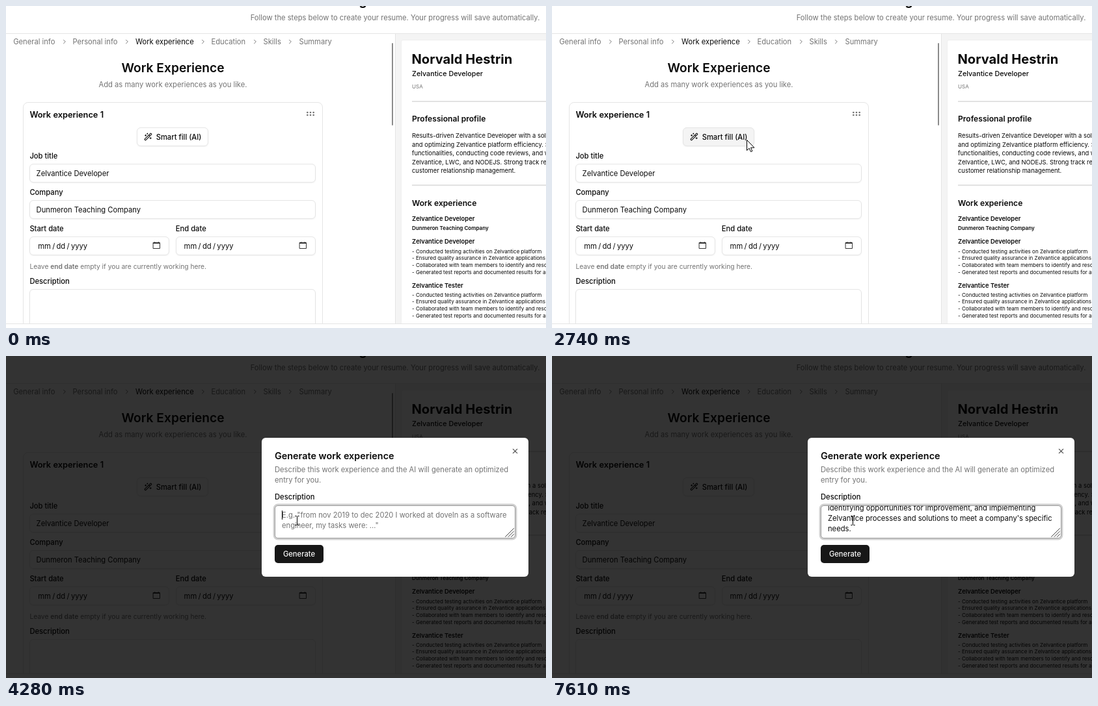
An HTML page that plays this animation: 830x496 px, repeating every 8000 ms.

```html
<!DOCTYPE html>
<html lang="en">
<head>
<meta charset="utf-8">
<title>Resume builder</title>
<style>
:root { --ink: #0a0a0a; --gray: #737373; --line: #e5e5e5; --t: 8s infinite; }
* { box-sizing: border-box; margin: 0; }
html, body { width: 100%; height: 100%; overflow: hidden; background: #fff; }
body { position: relative; font: 11.2px/20px Inter, sans-serif; font-optical-sizing: none; color: var(--ink); }
p, div, svg { position: absolute; }
svg { overflow: visible; fill: none; stroke-linecap: round; stroke-linejoin: round; }

/* --x is the left edge (or middle with .c), --y the middle of the line */
p { left: calc(var(--x) * 1px); top: calc(var(--y) * 1px - 10px); white-space: pre; }
.c { width: 500px; margin-left: -250px; text-align: center; }
.g { color: var(--gray); }
.m { font-weight: 500; }
.s, p b { font-weight: 600; }
.b { font-weight: 700; }
.h1 { font-size: 19.2px; }
.h2 { font-size: 14.4px; }
.h3 { font-size: 12.8px; }
.hint { font-size: 10.24px; }
.date { word-spacing: -.8px; }

.page { inset: 0; overflow: hidden; }
.head { left: 0; top: 42px; width: 100%; height: 1px; background: var(--line); }
.main { inset: 0 0 7px; overflow: hidden; }
.foot { left: 0; top: 489px; width: 100%; height: 7px; background: #fff; border-top: 1px solid var(--line); }
.card { left: 26px; top: 148px; width: 461px; height: 500px; border: 1px solid var(--line); border-radius: 8px; }
.box { border: 1px solid var(--line); border-radius: 6px; background: #fff; box-shadow: 0 1px 2px rgba(0,0,0,.05); height: 29px; width: 440px; left: 36px; }
.half { width: 215px; }
.fill { left: 201px; top: 187px; width: 110px; animation: hover var(--t) step-end; }
.thumb { left: 593px; top: 57px; width: 2px; height: 127px; border-radius: 1px; background: #8b8b8b; animation: thumb var(--t) step-end; }
.chev { stroke: var(--gray); stroke-width: .95; width: 4px; height: 6px; top: 52px; }
.cal { top: 363px; width: 11px; height: 11px; stroke: #333; }

.side { left: 598px; top: 43px; width: 240px; height: 446px; background: #f4f4f4; border-left: 1px solid var(--line); }
.paper { left: 608px; top: 53px; width: 300px; height: 500px; background: #fff; border-radius: 2px; box-shadow: 0 0 2px rgba(0,0,0,.08); }
.name { font-size: 20.15px; }
.role { font-size: 10.75px; }
.sec { font-size: 12.1px; }
.txt { font-size: 9.42px; line-height: 13.5px; }
.job { font-size: 9.42px; }
.tiny { font-size: 8.06px; }
.list { font-size: 8.06px; line-height: 10.7px; }
.rule { left: 624px; width: 300px; height: 2px; background: #e2e2e2; }

.modal { inset: 0; background: rgba(0,0,0,.8); animation: modal var(--t) step-end; }
.dialog { left: 393px; top: 126px; width: 410px; height: 214px; border-radius: 6px; background: #fff; }
.area { left: 413px; top: 230px; width: 370px; height: 51px; border: 1px solid #9c9c9c; border-radius: 5px; background: #fff; box-shadow: 0 0 0 2.4px #d0d0d0; overflow: hidden; }
.area p { left: 10px; line-height: 16px; }
.area .hold { top: 6px; animation: hold var(--t) step-end; }
.area .paste { top: -15px; animation: paste var(--t) step-end; }
.send { left: 413px; top: 291px; width: 75px; height: 28px; border-radius: 5px; background: #171717; }
.caret { left: 424px; top: 238px; width: 1px; height: 14px; background: #000; animation: caret var(--t) step-end; }
.beam { left: -3.5px; top: -7.5px; width: 7px; height: 15px; animation: beam var(--t) step-end; }
.arrow { left: 0; top: 0; width: 12px; height: 19px; animation: arrow var(--t) step-end; }

@keyframes hover { 0%, 35.875% { background: #fff } 24.3% { background: #f4f4f4 } }
@keyframes thumb { 0% { opacity: 1 } 69.375%, to { opacity: 0 } }
@keyframes modal { 0% { opacity: 0 } 35.875%, to { opacity: 1 } }
@keyframes hold { 0% { opacity: 1 } 65.25%, to { opacity: 0 } }
@keyframes paste {
  0% { opacity: 0; transform: none }
  65.25% { opacity: 1; transform: none }
  81.875% { opacity: 1; transform: translateY(16px) }
  87.75%, to { opacity: 1; transform: translateY(10px) }
}
@keyframes caret {
  0%, 50.25%, 63.5% { opacity: 1; transform: none }
  43.625%, 56.875% { opacity: 0; transform: none }
  65.25%, 78.625% { opacity: 1; transform: translate(3px, 27px) }
  72% { opacity: 0; transform: translate(3px, 27px) }
  81.125% { opacity: 1; transform: translate(0, 27px) }
  81.875% { opacity: 1; transform: translate(35px, 27px) }
  87.75% { opacity: 1; transform: translate(35px, 21px) }
  95.125%, to { opacity: 0; transform: translate(35px, 21px) }
}
@keyframes beam {
  0% { opacity: 0; transform: translate(435px, 253px) }
  46.125% { opacity: 1; transform: translate(435px, 253px) }
  48.625% { opacity: 1; transform: translate(425px, 255px) }
  50.25% { opacity: 1; transform: translate(439px, 254px) }
  53.5% { opacity: 1; transform: translate(447px, 253px) }
  54.375% { opacity: 1; transform: translate(459px, 253px) }
  71.125% { opacity: 1; transform: translate(461px, 253px) }
  93.5%, to { opacity: 1; transform: translate(462px, 253px) }
}
@keyframes arrow {
  0% { visibility: hidden; transform: translate(766px, 486px) }
  10.375% { visibility: visible; transform: translate(766px, 486px); animation-timing-function: steps(4) }
  13.875% { visibility: visible; transform: translate(606px, 360px); animation-timing-function: steps(4) }
  17.375% { visibility: visible; transform: translate(480px, 264px); animation-timing-function: steps(3) }
  20% { visibility: visible; transform: translate(376px, 224px); animation-timing-function: steps(3) }
  22.625% { visibility: visible; transform: translate(322px, 211px); animation-timing-function: steps(4) }
  26% { visibility: visible; transform: translate(299px, 206px) }
  40% { visibility: visible; transform: translate(299px, 206px); animation-timing-function: steps(6) }
  46.125%, to { visibility: hidden; transform: translate(427px, 244px) }
}
</style>
</head>
<body>
<div class="page">
  <p class="c h1 b" style="--x:598;--y:-8">Design Your Resume</p>
  <p class="c g" style="--x:598;--y:18">Follow the steps below to create your resume. Your progress will save automatically.</p>
  <div class="head"></div>

  <div class="main">
    <p class="g" style="--x:11.2;--y:55">General info</p>
    <p class="g" style="--x:102.4;--y:55">Personal info</p>
    <p style="--x:199;--y:55">Work experience</p>
    <p class="g" style="--x:315.5;--y:55">Education</p>
    <p class="g" style="--x:395.5;--y:55">Skills</p>
    <p class="g" style="--x:450.5;--y:55">Summary</p>
    <svg class="chev" style="left:88px"><path d="M.5 .2 3.3 3 .5 5.8"/></svg>
    <svg class="chev" style="left:184px"><path d="M.5 .2 3.3 3 .5 5.8"/></svg>
    <svg class="chev" style="left:301px"><path d="M.5 .2 3.3 3 .5 5.8"/></svg>
    <svg class="chev" style="left:381px"><path d="M.5 .2 3.3 3 .5 5.8"/></svg>
    <svg class="chev" style="left:435px"><path d="M.5 .2 3.3 3 .5 5.8"/></svg>

    <p class="c h1 s" style="--x:256.5;--y:95">Work Experience</p>
    <p class="c g" style="--x:256.5;--y:121">Add as many work experiences as you like.</p>
    <div class="thumb"></div>

    <div class="card"></div>
    <p class="h3 s" style="--x:36.4;--y:168">Work experience 1</p>
    <svg style="left:460px;top:158px" width="16" height="16" viewBox="0 0 24 24">
      <g fill="#737373"><circle cx="5" cy="9" r="2"/><circle cx="12" cy="9" r="2"/><circle cx="19" cy="9" r="2"/><circle cx="5" cy="15" r="2"/><circle cx="12" cy="15" r="2"/><circle cx="19" cy="15" r="2"/></g>
    </svg>
    <div class="box fill"></div>
    <svg style="left:211.6px;top:195px" width="12.8" height="12.8" viewBox="0 0 24 24" stroke="#0a0a0a" stroke-width="2">
      <path d="m21.64 3.64-1.28-1.28a1.21 1.21 0 0 0-1.72 0L2.36 18.64a1.21 1.21 0 0 0 0 1.72l1.28 1.28a1.2 1.2 0 0 0 1.72 0L21.64 5.36a1.2 1.2 0 0 0 0-1.72M14 7l3 3M5 6v4M19 14v4M10 2v2M7 8H3M21 16h-4M11 3H9"/>
    </svg>
    <p class="m" style="--x:230.7;--y:202">Smart fill (AI)</p>

    <p class="m" style="--x:36.4;--y:231">Job title</p>
    <div class="box" style="top:243px"></div>
    <p style="--x:46.6;--y:258">Zelvantice Developer</p>
    <p class="m" style="--x:36.4;--y:287">Company</p>
    <div class="box" style="top:299px"></div>
    <p style="--x:46.6;--y:314">Dunmeron Teaching Company</p>

    <p class="m" style="--x:36.4;--y:343">Start date</p>
    <p class="m" style="--x:260.8;--y:343">End date</p>
    <div class="box half" style="top:355px"></div>
    <div class="box half" style="top:355px;left:261px"></div>
    <p class="date" style="--x:49.2;--y:370">mm / dd / yyyy</p>
    <p class="date" style="--x:273.6;--y:370">mm / dd / yyyy</p>
    <svg class="cal" style="left:226px"><path d="M.5 1.5h10v9H.5zM.5 2.5h10M2.7.5v1M8.3.5v1"/></svg>
    <svg class="cal" style="left:451px"><path d="M.5 1.5h10v9H.5zM.5 2.5h10M2.7.5v1M8.3.5v1"/></svg>
    <p class="hint g" style="--x:36.4;--y:401">Leave <b>end date</b> empty if you are currently working here.</p>
    <p class="m" style="--x:36.4;--y:424">Description</p>
    <div class="box" style="top:436px;height:90px"></div>

    <div class="side"></div>
    <div class="paper"></div>
    <p class="name b" style="--x:623.5;--y:82">Norvald Hestrin</p>
    <p class="role m" style="--x:624;--y:105">Zelvantice Developer</p>
    <p class="tiny g" style="--x:624;--y:124">USA</p>
    <div class="rule" style="top:146px"></div>
    <p class="sec s" style="--x:624;--y:174">Professional profile</p>
    <p class="txt" style="--x:624;--y:203">Results-driven Zelvantice Developer with a solid background in designing
and optimizing Zelvantice platform efficiency. Skilled in building
functionalities, conducting code reviews, and working with
Zelvantice, LWC, and NODEJS. Strong track record in
customer relationship management.</p>
    <div class="rule" style="top:275px"></div>
    <p class="sec s" style="--x:624;--y:304">Work experience</p>
    <p class="job s" style="--x:624;--y:328">Zelvantice Developer</p>
    <p class="tiny s" style="--x:624;--y:342">Dunmeron Teaching Company</p>
    <p class="job s" style="--x:624;--y:363">Zelvantice Developer</p>
    <p class="list" style="--x:624;--y:382.7">- Conducted testing activities on Zelvantice platform
- Ensured quality assurance in Zelvantice applications
- Collaborated with team members to identify and resolve issues
- Generated test reports and documented results for analysis</p>
    <p class="job s" style="--x:624;--y:431">Zelvantice Tester</p>
    <p class="list" style="--x:624;--y:449.7">- Conducted testing activities on Zelvantice platform
- Ensured quality assurance in Zelvantice applications
- Collaborated with team members to identify and resolve issues
- Generated test reports and documented results for analysis</p>
  </div>
  <div class="foot"></div>
</div>

<div class="modal">
  <div class="dialog"></div>
  <p class="h2 s" style="--x:413;--y:154">Generate work experience</p>
  <svg style="left:779px;top:143px" width="7" height="7" stroke="#444" stroke-width="1.05"><path d="M.3.3 6.7 6.7M6.7.3.3 6.7"/></svg>
  <p class="g" style="--x:413;--y:177;line-height:16px">Describe this work experience and the AI will generate an optimized
entry for you.</p>
  <p class="m" style="--x:413;--y:217">Description</p>
  <div class="area">
    <p class="hold g">E.g. "from nov 2019 to dec 2020 I worked at doveln as a software
engineer, my tasks were: ..."</p>
    <p class="paste">identifying opportunities for improvement, and implementing
Zelvantice processes and solutions to meet a company's specific
needs.</p>
    <svg style="left:353px;top:34px" width="14" height="14" stroke="#444"><path d="M.5 13.5 13.5.5M5 13.5 13.5 5M9.5 13.5l4-4"/></svg>
  </div>
  <div class="caret"></div>
  <div class="send"></div>
  <p class="c m" style="--x:450.5;--y:305;color:#fafafa">Generate</p>
  <svg class="beam" stroke="#000"><path d="M.7.5h1.8l1 1 1-1h1.8M3.5 1.5v12M.7 14.5h1.8l1-1 1 1h1.8"/></svg>
</div>

<svg class="arrow" stroke="#000"><path fill="#fff" stroke-linejoin="miter" d="M.5.8v15.7l3.6-3.4 2.5 5.4 2.3-1-2.4-5.3h5z"/></svg>
</body>
</html>
```
